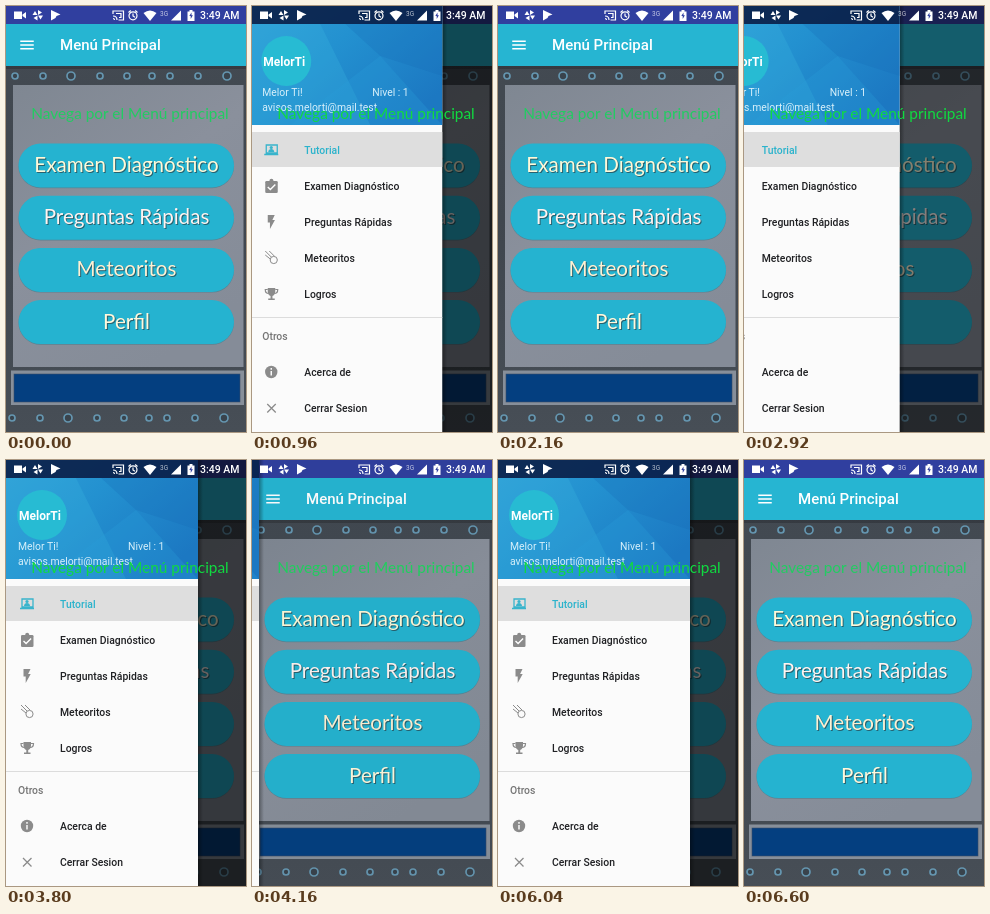
These frames come from a looping animation (240x426 px, 6.64 s). An HTML page:

```html
<!DOCTYPE html>
<html lang="es">
<head>
<meta charset="utf-8">
<title>Menú Principal</title>
<style>
  html, body { margin: 0; width: 100%; height: 100%; overflow: hidden; background: #454c54; }
  svg { display: block; width: 100%; height: 100%; font-family: Roboto, sans-serif; }
  .hand { font-family: Lato, sans-serif; font-size: 20.6px; text-anchor: middle; }
  .item { font-size: 10.4px; font-weight: 500; fill: #202124; }
  .head { font-size: 10.4px; fill: #d8f0fa; }
</style>
</head>
<body>
<svg viewBox="0 0 240 426" preserveAspectRatio="none">
  <defs>
    <linearGradient id="wall" x2="0" y2="1">
      <stop stop-color="#444b53"/><stop offset=".5" stop-color="#3f464e"/><stop offset="1" stop-color="#474e56"/>
    </linearGradient>
    <linearGradient id="panel" x2=".6" y2="1">
      <stop stop-color="#7f8792"/><stop offset=".5" stop-color="#8a909c"/><stop offset="1" stop-color="#858c98"/>
    </linearGradient>
    <linearGradient id="sky" x2="1" y2=".7">
      <stop stop-color="#2f9fd6"/><stop offset=".45" stop-color="#2391d0"/><stop offset="1" stop-color="#1c78c2"/>
    </linearGradient>
    <linearGradient id="edge">
      <stop stop-opacity=".35"/><stop offset="1" stop-opacity="0"/>
    </linearGradient>
    <clipPath id="face"><circle cx="36" cy="55" r="25"/></clipPath>
  </defs>

  <rect width="240" height="426" fill="url(#wall)"/>
  <g id="rings" fill="#39434c" stroke="#6596b0" stroke-width="1.7"></g>
  <rect x="7" y="79" width="230.500" height="282" fill="url(#panel)"/>
  <rect x="5" y="364.500" width="233" height="34.500" fill="#878f9a"/>
  <rect x="8" y="368" width="226" height="28" fill="#043f80" stroke="#3a4c66" stroke-width=".6"/>
  <g id="buttons"></g>

  <rect y="18" width="240" height="42" fill="#26b5d2"/>
  <rect y="60" width="240" height="3" fill="#000" opacity=".2"/>
  <path d="M14.250 35.250h13.500M14.250 39h13.500M14.250 42.750h13.500" stroke="#fff" stroke-width="1.5"/>
  <text x="54" y="44.300" font-size="15" font-weight="500" fill="#fff">Menú Principal</text>
  <rect width="240" height="18" fill="#303f9f"/>

  <rect id="scrim" width="240" height="426"/>
  <g id="drawer">
    <rect x="192" width="5" height="426" fill="url(#edge)"/>
    <rect width="192" height="426" fill="#fbfbfb"/>
    <rect width="192" height="119" fill="url(#sky)"/>
    <path d="M0 18H70L120 119H0Z" fill="#39b3de" opacity=".3"/>
    <path d="M95 18H192V70L130 50Z" fill="#1668b4" opacity=".25"/>
    <path d="M40 119L130 50L192 119Z" fill="#2a9cd8" opacity=".3"/>
    <rect width="192" height="18" fill="#04082e" opacity=".76"/>
    <circle cx="36" cy="55" r="25" fill="#27bbd3"/>
    <text x="13" y="59.500" font-size="12" font-weight="700" fill="#fff" clip-path="url(#face)">MelorTi</text>
    <text class="head" x="12" y="90">Melor Ti!</text>
    <text class="head" x="122" y="90">Nivel : 1</text>
    <text class="head" x="12" y="104.500">avisos.melorti@mail.test</text>
    <rect y="126" width="192" height="35" fill="#dedede"/>
    <path d="M0 311.500H192" stroke="#dcdcdc"/>
    <text class="item" x="12" y="333.700" style="fill:#757575">Otros</text>
    <g id="items"></g>
    <g fill="#8b8b8b" stroke="#8b8b8b" stroke-width="0">
      <path d="M16 139h11v8h-11zM14 148.500h14" fill="none" stroke="#38b4cc" stroke-width="1.3"/>
      <path d="M18 146c0-4 6-4 6 0z" fill="#38b4cc"/><circle cx="21" cy="141.500" r="1.6" fill="#38b4cc"/>
      <rect x="15" y="175" width="12.500" height="12" rx="1.3"/><circle cx="21.200" cy="174.700" r="2"/>
      <path d="M17.500 181l2.600 2.600 5-5" fill="none" stroke="#fff" stroke-width="1.4"/>
      <path d="M17.500 209h7l-2.400 5h2.600l-5 9v-6.500h-2.200z"/>
      <g fill="none" stroke-width="1"><circle cx="23.500" cy="254" r="3.600"/><path d="M15 245l6 6M19 245l5 5M15 249l5 4"/></g>
      <path d="M17.500 282h7.500v4q-.6 3.500-2.800 4v2.500h2.300v1.500h-6.500v-1.500h2.300v-2.500q-2.200-.5-2.800-4z"/>
      <path d="M17.500 283.500h-2.500q0 4 3.500 4M25 283.500h2.500q0 4-3.500 4" fill="none" stroke-width="1.2"/>
      <circle cx="21" cy="366" r="6.200"/><path d="M21 365v4.500M21 362v1.700" stroke="#fff" stroke-width="1.4"/>
      <path d="M17 398l8.500 8.500M25.500 398l-8.500 8.500" stroke-width="1.3"/>
    </g>
  </g>

  <text id="hint" class="hand" x="124" y="112.500" style="font-size:15.4px">Navega por el Menú principal</text>

  <g fill="#fff">
    <path d="M8 5.500h8v7.500h-8zM16.500 8.500l3.500-2.500v6.500l-3.500-2.500z"/>
    <path d="M32 9V4l4 2.500zM32 9.500h5l-2.500 4zM31.500 9.500v5l-4-2.500zM31.500 9h-5l2.500-4z"/>
    <path d="M45 4l9.500 4.500-4 1.500-1 2-4.500 2.500z"/>
    <g fill="none" stroke="#fff" stroke-width="1.2">
      <path d="M107 8v-3h10.500v9h-5M107 10q4 0 4 4M107 12.500q1.500 0 1.500 1.500M110 7.500h5v4h-2"/>
      <circle cx="127" cy="9.800" r="4"/><path d="M127 7.500v2.500l2 1.200M122.500 6.500l2.300-2M131.500 6.500l-2.300-2"/>
    </g>
    <path d="M137.500 7q6.500-5 13 0l-6.500 8z"/>
    <text x="154" y="9.500" font-size="6.500" opacity=".7">3G</text>
    <path d="M175 4.500v10h-10z"/>
    <path d="M181.500 5.500h2v-1.500h3v1.500h2v9.500h-7z"/>
    <path d="M185.500 6.500l-2.200 3.500h1.400v3l2.200-3.800h-1.400z" fill="#303f9f"/>
    <text x="194" y="13.200" font-size="10.500" font-weight="500">3:49 AM</text>
  </g>
  <circle id="touch" r="7.500" fill="#d9d9d9" stroke="#fff" stroke-opacity=".4"/>
</svg>
<script>
const $ = id => document.getElementById(id);
const LOOP = 6640, STEP = 40, WIDTH = 192, SETTLE = 512;

// Each slide: start time, target (1 open, 0 closed)
const slides = [[648, 1], [1752, 0], [2775, 1], [3912, 0], [5132, 1], [6152, 0]];

// Each ring: x in the top row, radius
const rings = [[9, 3], [37, 3], [65, 4], [94, 3], [121, 3], [146, 3], [164, 3], [192, 3], [221, 4]];
$('rings').innerHTML = rings.map(([x, r]) =>
  `<circle cx="${x}" cy="70" r="${r}"/><circle cx="${x - 3}" cy="412" r="${r}"/>`).join('');

const buttons = [['Examen Diagnóstico', '#fff9d8'], ['Preguntas Rápidas', '#fff3f0'],
  ['Meteoritos', '#fff0d2'], ['Perfil', '#fff8dc']];
$('buttons').innerHTML = buttons.map(([label, fill], i) => {
  const y = 137.5 + 52.2 * i;
  const box = (dy, color) =>
    `<rect x="12.500" y="${y + dy}" width="215.500" height="44" rx="22" fill="${color}"/>`;
  const text = (d, color) =>
    `<text class="hand" x="${120.5 + d}" y="${y + 28.5 + d}" fill="${color}">${label}</text>`;
  return box(0.7, '#5b8291') + box(0, '#25b3d0') + text(1, '#28616f') + text(0, fill);
}).join('');

const items = [['Tutorial', 144], ['Examen Diagnóstico', 180], ['Preguntas Rápidas', 216],
  ['Meteoritos', 252], ['Logros', 288], ['Acerca de', 366], ['Cerrar Sesion', 402]];
$('items').innerHTML = items.map(([label, y], i) =>
  `<text class="item" x="54" y="${y + 3.8}"${i ? '' : ' style="fill:#2bb3cc"'}>${label}</text>`).join('');

const clamp = v => Math.min(1, Math.max(0, v));
const settle = u => 1 - (1 - clamp(u)) ** 5;

function openness(t) {
  let p = 0;
  for (const [start, target] of slides)
    if (t >= start) p += (target - p) * settle((t - start) / SETTLE);
  return p;
}

function drawTouch(t) {
  let alpha = 0;
  for (const [start, target] of slides) {
    const from = target ? start - 90 : start - 10;
    const to = target ? start + 30 : start + 130;
    if (t < from || t >= to) continue;
    alpha = target ? 0.3 : 0.75;
    $('touch').setAttribute('cx', target ? 21 : 218);
    $('touch').setAttribute('cy', target ? 39 : 95);
  }
  $('touch').setAttribute('opacity', alpha);
}

function draw(t) {
  const p = openness(t);
  $('drawer').setAttribute('transform', `translate(${((p - 1) * WIDTH).toFixed(2)})`);
  $('drawer').setAttribute('visibility', p < 0.002 ? 'hidden' : 'visible');
  $('scrim').setAttribute('opacity', 0.6 * p);
  const k = clamp(p * 3);
  $('hint').setAttribute('fill', `rgb(${34 - 18 * k},${204 + 14 * k},${98 - 34 * k})`);
  drawTouch(t);
}

const origin = performance.now();
function tick() {
  const t = (performance.now() - origin) % LOOP;
  draw(Math.floor(t / STEP) * STEP);
  requestAnimationFrame(tick);
}
tick();
</script>
</body>
</html>
```
